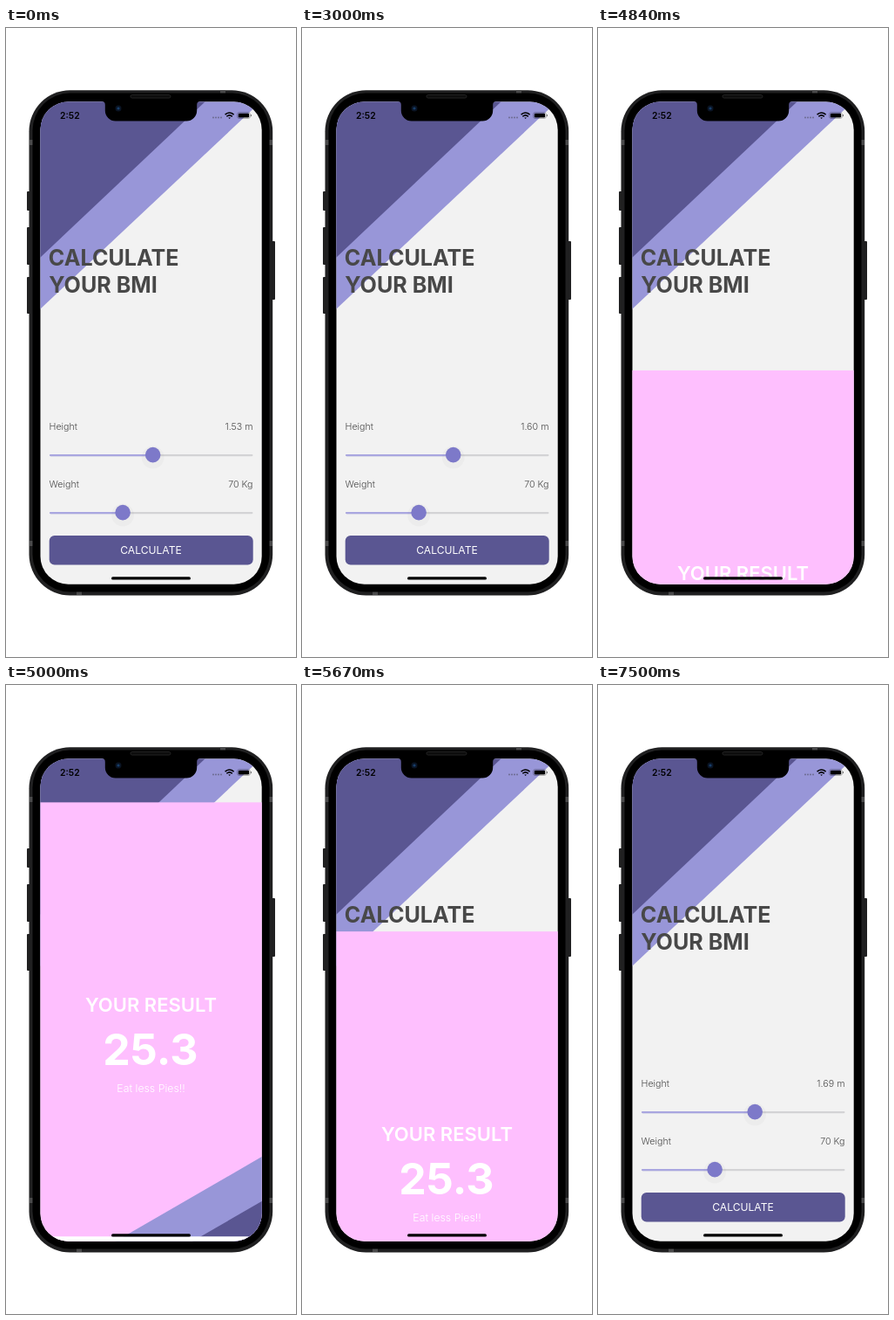
An HTML page that plays this animation: 333 by 720 pixels, repeating every 8 s.

```html
<!DOCTYPE html>
<html lang="en">
<head>
<meta charset="utf-8">
<title>BMI calculator</title>
<style>
  html, body { margin: 0; width: 100%; height: 100%; overflow: hidden; background: #fff; }
  svg { display: block; width: 333px; height: 720px; font-family: Inter, "Liberation Sans", sans-serif; }
  .title { font-size: 25.1px; font-weight: 700; fill: #484848; }
  .label { font-size: 10.7px; font-weight: 300; fill: #4c4c4c; }
  .button { font-size: 12.1px; font-weight: 400; }
  .end { text-anchor: end; }
  .mid { text-anchor: middle; }
  .dark { fill: #5a5692; }
  .light { fill: #9896d8; }
</style>
</head>
<body>
<svg viewBox="0 0 333 720">
  <defs>
    <clipPath id="screen"><rect x="39.5" y="84.5" width="254.2" height="552.2" rx="32"/></clipPath>
    <g id="knob">
      <circle cy="3" r="13" fill="#000" opacity=".025"/>
      <circle r="8.8" fill="#7d79c9"/>
    </g>
  </defs>

  <!-- phone body -->
  <g fill="#202021">
    <rect x="24" y="187" width="5" height="22" rx="1"/>
    <rect x="24" y="228" width="5" height="43" rx="1"/>
    <rect x="24" y="285" width="5" height="42" rx="1"/>
    <rect x="304" y="244" width="5" height="67" rx="1"/>
    <rect x="26.5" y="71.2" width="279.7" height="578.3" rx="47"/>
  </g>
  <path d="M27 131h4M302 131h4M27 590h4M302 590h4" stroke="#4a4a4b" stroke-width="6"/>
  <path d="M249 71.200v4M84 645v4" stroke="#4a4a4b" stroke-width="6"/>
  <rect x="30.5" y="74.5" width="272" height="571" rx="43"/>

  <g clip-path="url(#screen)">
    <!-- form -->
    <rect x="39" y="84" width="255" height="553" fill="#f2f2f2"/>
    <path class="light" d="M39 84H293L39 322Z"/>
    <path class="dark" d="M39 84H229L39 263Z"/>
    <text class="title" x="48.8" y="271.9">CALCULATE</text>
    <text class="title" x="49.3" y="302.9">YOUR BMI</text>

    <text class="label" x="49.5" y="460">Height</text>
    <text class="label end" id="height" x="283.5" y="460"></text>
    <rect x="50" y="488" width="233.5" height="2.2" rx="1.1" fill="#d3d3d5"/>
    <rect id="fill" x="50" y="488" height="2.2" rx="1.1" fill="#a9a6e0"/>
    <use href="#knob" id="thumb" y="488.6"/>

    <text class="label" x="49.5" y="526">Weight</text>
    <text class="label end" x="283.5" y="526">70 Kg</text>
    <rect x="50" y="554" width="233.5" height="2.2" rx="1.1" fill="#d3d3d5"/>
    <rect x="50" y="554" width="84" height="2.2" rx="1.1" fill="#a9a6e0"/>
    <use href="#knob" x="134.1" y="554.6"/>

    <rect class="dark" x="49.7" y="581" width="234" height="33.5" rx="6"/>
    <text class="button mid" id="calc" x="166.5" y="602.3" fill="#fff">CALCULATE</text>

    <!-- result sheet -->
    <g id="sheet">
      <rect x="39" y="84" width="255" height="553" fill="#febffe"/>
      <path class="light" d="M294 489.5V637H38Z"/>
      <path class="dark" d="M294 540.5V637H126Z"/>
      <g class="mid" fill="#fff">
        <text x="166.5" y="324" font-size="22" font-weight="600">YOUR RESULT</text>
        <text x="166" y="385" font-size="50" font-weight="700">25.3</text>
        <text x="166.5" y="415.5" font-size="12.3" font-weight="300">Eat less Pies!!</text>
      </g>
      <rect x="49.7" y="581" width="234" height="33.5" rx="6" fill="#fff"/>
      <text class="button mid dark" id="recalc" x="166.5" y="602.3">RECALCULATE</text>
    </g>

    <!-- status bar and home indicator -->
    <text x="62" y="104" font-size="10.4" font-weight="600">2:52</text>
    <g fill="#55556a" opacity=".7">
      <circle cx="238" cy="102.5" r=".9"/><circle cx="241" cy="102.5" r=".9"/>
      <circle cx="244" cy="102.5" r=".9"/><circle cx="247" cy="102.5" r=".9"/>
    </g>
    <g fill="none" stroke="#000" stroke-width="1.6">
      <path d="M251.6 99.2q5-4.4 10 0M253.4 101.3q3.2-2.7 6.4 0"/>
      <path d="M255.2 102.6h2.8l-1.4 1.4z" fill="#000" stroke="none"/>
    </g>
    <rect x="265.7" y="96.7" width="14.6" height="6.8" rx="2" fill="none" stroke="#000" stroke-opacity=".4" stroke-width=".7"/>
    <rect x="266.8" y="97.7" width="12.4" height="4.8" rx="1.2"/>
    <path d="M281.5 99v2.2" stroke="#000" stroke-opacity=".5"/>
    <rect x="121" y="628.3" width="91" height="3.2" rx="1.6"/>
  </g>

  <!-- notch -->
  <path d="M110 84H223A4 4 0 0 0 219.2 88V94.500A12 12 0 0 1 207.2 106.500H125.800A12 12 0 0 1 113.800 94.500V88A4 4 0 0 0 110 84Z"/>
  <rect x="143" y="76.5" width="46" height="3.6" rx="1.8" fill="#0c0c0c" stroke="#2a2a2a" stroke-width=".8"/>
  <circle cx="129" cy="92" r="3.5" fill="#0a1424"/>
  <circle cx="129" cy="92" r="1.6" fill="#173d68"/>
</svg>
<script>
const LOOP = 8000, TRAVEL = 552, OPEN = 4733, CLOSE = 5583;
const $ = id => document.getElementById(id);

// [start time, height in metres] after the first drag
const steps = [[3000, 1.60], [3160, 1.668], [6660, 1.68], [6990, 1.67], [7330, 1.68], [7490, 1.69]];

function heightAt(t) {
  const step = steps.filter(([start]) => t >= start).pop();
  return step ? step[1] : 1.53 + 0.06 * Math.min(1, t / 2170);
}

// Critically damped spring: 1 at the start, settling to 0
function spring(t, start) {
  const x = Math.max(0, t - start) * 0.015;
  return (1 + x) * Math.exp(-x);
}

function sheetOffset(t) {
  return TRAVEL * (t < CLOSE ? spring(t, OPEN) : 1 - spring(t, CLOSE));
}

function draw(now) {
  // The picture advances six times a second
  const tick = Math.floor((now % LOOP + 5) * 0.006) % 48;
  const t = Math.round(tick * 1000 / 6);

  const h = heightAt(t), x = 166.5 + (h - 1.5) * 72;
  $("height").textContent = h.toFixed(2) + " m";
  $("thumb").setAttribute("x", x);
  $("fill").setAttribute("width", x - 50);

  const y = sheetOffset(t);
  $("sheet").setAttribute("transform", `translate(0 ${y.toFixed(2)})`);
  $("sheet").style.display = y > TRAVEL - 1 ? "none" : "";
  $("calc").style.opacity = tick === 28 ? 0.22 : 1;
  $("recalc").style.opacity = tick === 33 ? 0.2 : tick === 34 ? 0.6 : 1;
  requestAnimationFrame(draw);
}
requestAnimationFrame(draw);
</script>
</body>
</html>
```
